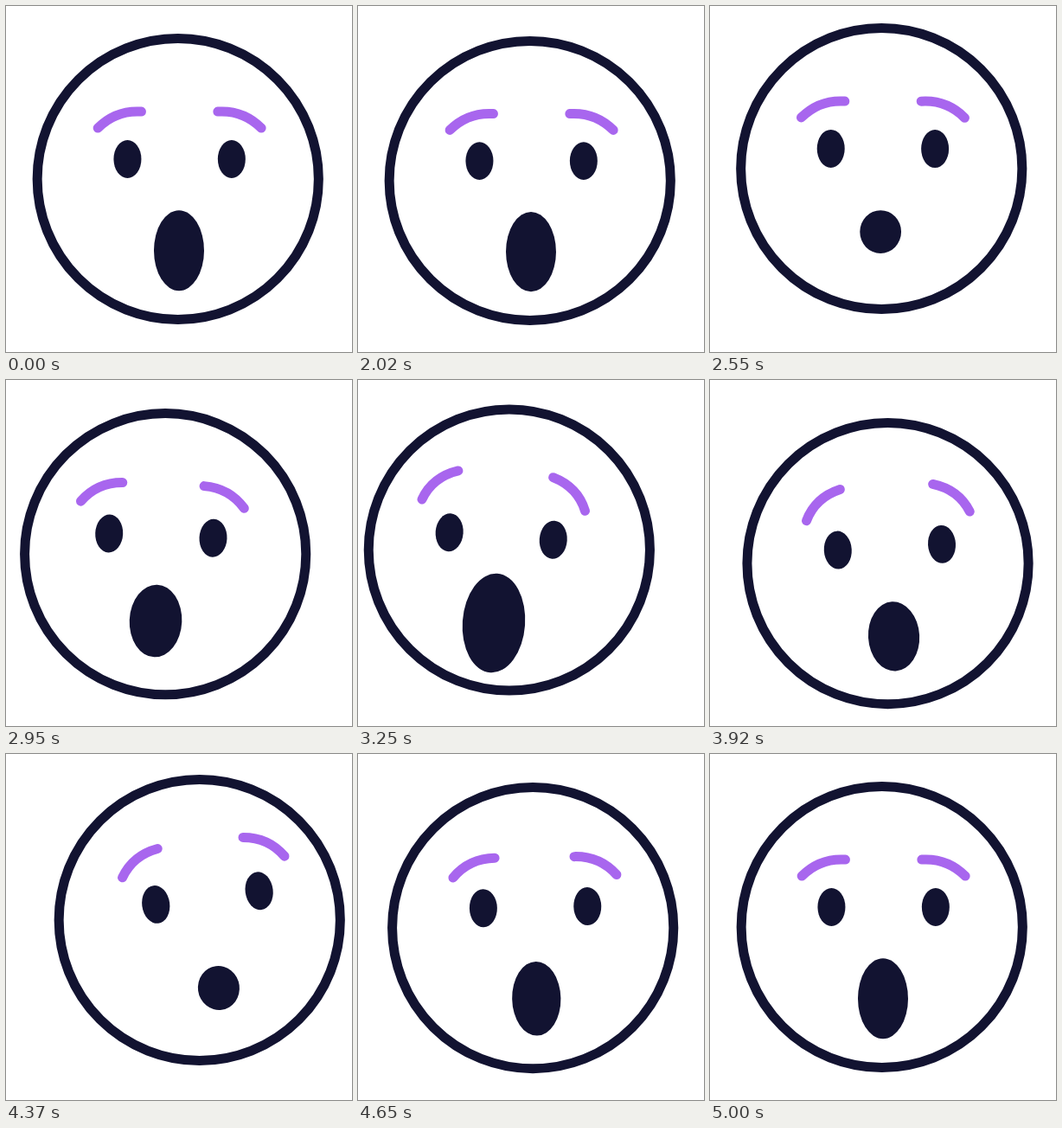
An HTML page that plays this animation: 400x400 px, repeating every 5.02 s.

```html
<!DOCTYPE html>
<html lang="en">
<head>
<meta charset="utf-8">
<title>Surprised face</title>
<style>
  html, body { margin: 0; width: 100%; height: 100%; overflow: hidden; background: #fff; }
  svg { display: block; width: 100%; height: 100%; }
  .ink { fill: #121331; }
  .outline { fill: none; stroke: #121331; stroke-width: 11; }
  .brow { fill: none; stroke: #a866ee; stroke-width: 11; stroke-linecap: round; }
</style>
</head>
<body>
<svg viewBox="0 0 400 400">
  <g id="head">
    <circle class="outline" r="162.6"/>
    <g id="features">
      <ellipse class="ink" cx="-60.2" rx="16" ry="22"/>
      <ellipse class="ink" cx="60.2" rx="16" ry="22"/>
      <path class="brow" id="brow"/>
      <use href="#brow" transform="scale(-1 1)"/>
      <ellipse class="ink" id="mouth"/>
    </g>
  </g>
</svg>
<script>
const LOOP = 5020, START = 2020;
const el = id => document.getElementById(id);
const head = el('head'), features = el('features'), brow = el('brow'), mouth = el('mouth');

// Every pose states only what differs from the resting face.
const rest = { x: 0, y: 0, lookX: 1.9, lookY: -23, tilt: 0, raise: 0,
               mouthY: 105.7, mouthW: 29, mouthH: 46.5 };
const pose = changes => ({ ...rest, ...changes });
const hop = pose({ y: -12.8, mouthY: 96, mouthW: 23.8, mouthH: 24.7 });
const left = pose({ x: -24.25, y: -3.8, lookX: -9.3, lookY: -15.8, tilt: 4.1, raise: 1,
                    mouthY: 101, mouthW: 36.4, mouthH: 58 });
const right = pose({ x: 25, y: -8, lookX: 9.2, lookY: -25.9, tilt: -7.5, raise: 0.5,
                     mouthY: 105.2, mouthW: 24, mouthH: 25.5 });
const land = pose({ y: 2.5 });

// A move dips the head on its way and may squash it.
const moves = [
  { from: 1992, to: 2480, pose: hop, dip: 60, squash: 0.2 },
  { from: 2480, to: 3310, pose: left, dip: 9 },
  { from: 3395, to: 4290, pose: right, dip: 20 },
  { from: 4390, to: 4730, pose: land },
  { from: 4730, to: 5000, pose: rest }
];

// Brows and gaze trail behind the head, the mouth a little.
const lag = { lookY: 2.6, raise: 2.6, mouthY: 1.3, mouthW: 1.3, mouthH: 1.3 };

const lerp = (a, b, p) => a + (b - a) * p;
const smooth = u => u * u * (3 - 2 * u);

function stateAt(t) {
  const state = { ...rest, squash: 1 };
  for (const { from, to, pose, dip = 0, squash = 0 } of moves) {
    if (t < from) break;
    const u = Math.min(1, (t - from) / (to - from));
    const bump = Math.sin(Math.PI * u) ** 2;
    for (const key in rest) {
      state[key] = lerp(state[key], pose[key], smooth(u) ** (lag[key] || 1));
    }
    state.y += dip * bump;
    state.squash -= squash * bump;
  }
  return state;
}

function browPath(raise) {
  const cx = lerp(-73.7, -84.5, raise), cy = lerp(-56.8, -63, raise);
  const ix = lerp(-44.2, -55.4, raise), iy = lerp(-54.9, -72.5, raise);
  return `M-94.5 -35.9Q${cx} ${cy} ${ix} ${iy}`;
}

function draw(time) {
  const s = stateAt(time < START ? 0 : time);
  head.setAttribute('transform', `translate(${198.75 + s.x} ${200 + s.y}) scale(1 ${s.squash})`);
  features.setAttribute('transform', `translate(${s.lookX} ${s.lookY}) rotate(${s.tilt})`);
  brow.setAttribute('d', browPath(s.raise));
  mouth.setAttribute('cx', (s.mouthY - 109) / 5);
  mouth.setAttribute('cy', s.mouthY);
  mouth.setAttribute('rx', s.mouthW);
  mouth.setAttribute('ry', s.mouthH);
}

const begin = performance.now();
function tick() {
  draw((performance.now() - begin) % LOOP);
  requestAnimationFrame(tick);
}
tick();
</script>
</body>
</html>
```
